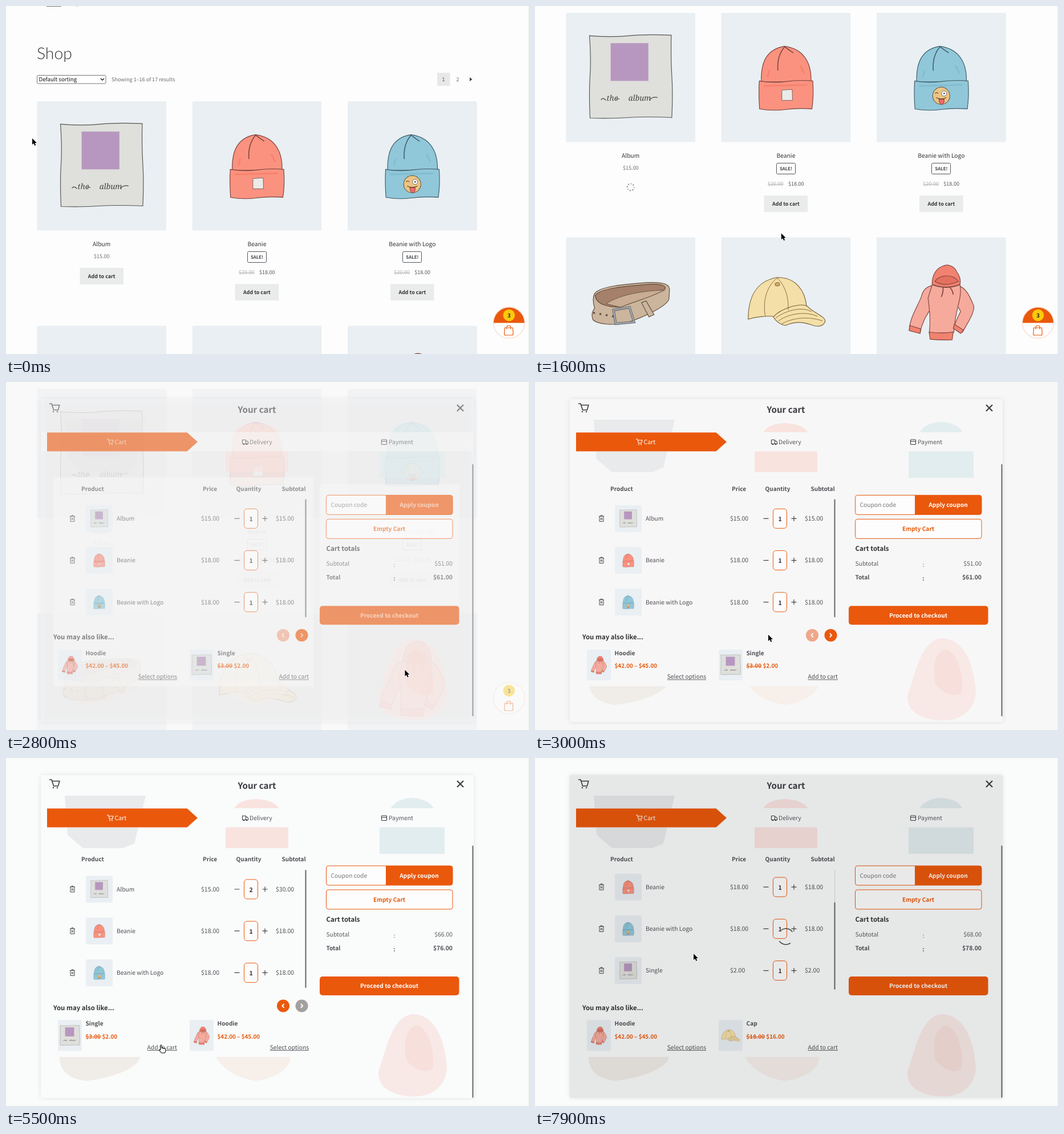
Write an HTML page with a canvas that moves like this. It is 917 by 610 pixels and loops after 8 s.

```html
<!DOCTYPE html>
<html lang="en">
<head>
<meta charset="utf-8">
<title>Shop</title>
<style>
html, body { margin: 0; width: 100%; height: 100%; overflow: hidden; background: #fdfdfd; }
canvas { display: block; }
</style>
</head>
<body>
<canvas id="stage" width="917" height="610"></canvas>
<script>
const g = document.getElementById('stage').getContext('2d');
const SANS = '"Noto Sans CJK JP", "Noto Sans CJK SC", "Noto Sans", sans-serif';
const ORANGE = '#ea580c', DARK = '#3c3c42', GREY = '#6d6d6d', TILE = '#e9eff3';

const clamp = v => Math.min(1, Math.max(0, v));
const ease = (t, a, b) => { const u = clamp((t - a) / (b - a)); return u * u * (3 - 2 * u); };

// ---- drawing helpers ----
function scoped(draw) { g.save(); draw(); g.restore(); }

// y is the middle of the capitals; returns the width
function text(s, x, y, size = 10.3, color = DARK, weight = 400, align = 'left') {
  g.font = `${weight} ${size}px ${SANS}`;
  g.textAlign = align;
  g.fillStyle = color;
  g.fillText(s, x, y + size * .37);
  return g.measureText(s).width;
}
function struck(s, x, y, size, color, weight) {
  const w = text(s, x, y, size, color, weight);
  g.fillRect(x, y + .3, w, .9);
  return w;
}
function box(x, y, w, h, r, fill, stroke, width = 1) {
  g.beginPath();
  g.roundRect(x, y, w, h, r);
  paint(fill, stroke, width);
}
function disc(x, y, r, fill, stroke, width = 1) {
  g.beginPath();
  g.arc(x, y, r, 0, 7);
  paint(fill, stroke, width);
}
function paint(fill, stroke, width, path) {
  if (fill) { g.fillStyle = fill; path ? g.fill(path) : g.fill(); }
  if (stroke) { g.strokeStyle = stroke; g.lineWidth = width; path ? g.stroke(path) : g.stroke(); }
}
function shape(d, fill, stroke, width = 1.15) { paint(fill, stroke, width, new Path2D(d)); }

// ---- product pictures, on a 226 unit tile ----
function album() {
  shape('M41 40Q80 43 110 40T184 39Q183 80 185 110T185 183Q140 181 110 183T42 184Q40 140 42 110T41 40Z', '#dfdfdc', '#555552');
  g.fillStyle = '#b797bf';
  g.fillRect(78, 53, 66, 66);
  g.font = 'italic 13.5px "Noto Serif", "Liberation Serif", serif';
  g.textAlign = 'left';
  g.fillStyle = '#444';
  g.fillText('the', 71, 154);
  g.fillText('album', 109, 154);
  shape('M61 152q4-5 9 1M88 152q3-3 5-1M146 152q6-6 14-4', null, '#444');
}
function beanie(color, ink, shade) {
  shape('M70 121C69 88 78 64 110 58.5C142 62 158 85 157 120Z', color, ink);
  shape('M66.5 119Q90 123 113 120T160 119Q162 145 158.5 168Q135 166 112 169T67 168Q65 140 66.5 119Z', color, ink);
  shape('M111 59Q97 75 99 101M110 58.5Q118 65 126 70', null, ink, 1.5);
  shape('M74 128L150 126M138 92l7 14M84 100l-3 12', null, shade, 3);
}
function redBeanie() {
  beanie('#fa927f', '#7a423b', '#f6836f');
  shape('M106 135L124 134L124.5 153L106 153Z', '#ebebea', '#7a5a55', .9);
}
function blueBeanie() {
  beanie('#90c7d9', '#3e5c68', '#82bdd0');
  disc(113, 145, 15, '#ecc584', '#5e5240');
  disc(118, 141, 4.5, '#fff', '#555', .8);
  disc(118, 141, 1.3, '#444');
  shape('M102 141q3-3 6 0M104 148q9 5 18 0', null, '#5e4530');
  shape('M109 151h9q1 8-4 9q-5 0-5-9Z', '#ee6a6a', '#7a3a3a', .9);
}
function belt() {
  const ink = '#5f4a3b', leather = '#cbb59d';
  shape('M50 98C58 86 100 82 140 79C165 78 180 80 181 90L180 108C176 120 140 138 104 150C80 154 55 152 47 144C44 136 45 130 50 124C47 114 47 104 50 98Z', leather, ink);
  shape('M51 101C60 89 105 85 145 82C168 81 178 85 172 92C150 104 120 112 95 122C75 122 52 118 51 101Z', '#a5806a', ink);
  shape('M70 116C95 100 130 94 172 92C150 104 120 112 95 122Z', '#c8ad94', ink, .8);
  for (const i of [0, 1, 2, 3]) disc(49 + i * 11, 132 + i * 2, 1.9, '#6b5344');
  shape('M83 127L111 122L119 148L87 151Z', null, '#53565b', 4);
  shape('M83 127L111 122L119 148L87 151Z', null, '#a6aab0', 2.4);
  shape('M132 114l8-3l14 24l-9 4Z', leather, ink);
}
function cap() {
  const ink = '#78633c', fill = '#f5dfa8';
  shape('M47 143C47 105 61 76 98 70C130 70 146 92 149 120C130 120 105 128 97 139C80 136 60 139 47 143Z', fill, ink);
  shape('M91 139C104 124 138 114 150 120C160 132 182 137 181.5 147C178 156 168 157 158 153C140 147 128 147 112 154C102 152 95 146 91 139Z', fill, ink);
  shape('M98 71C78 85 72 115 77 138M98 71C112 85 118 105 117 127M95 141C112 128 140 120 158 130M100 146C116 134 146 128 168 138M106 151C124 141 150 137 177 146', null, ink, .9);
  g.beginPath();
  g.ellipse(98, 82, 4, 3, 0, 0, 7);
  paint('#d8ac5c', ink, 1);
}
function hoodie() {
  const ink = '#80443d', fill = '#f5aa9c', deep = '#f28270';
  shape('M144 85C157 88 164 106 170 120C171 132 160 148 150 166L135 157C139 144 144 136 147 129L136 112Z', fill, ink);
  shape('M98 84C86 86 81 93 78 104C72 120 58 140 57 162L76 167C79 150 86 138 95 124Z', fill, ink);
  shape('M97 83Q122 92 146 83C150 108 137 125 135 166L92 168C95 142 92 125 90 106Z', fill, ink);
  shape('M92 165.5Q112 169 134 165.5L132 179Q112 180 93.5 178Z', deep, ink);
  shape('M58 154L77 160L76 168L57 163ZM136 152L152 162L147 168L134 159Z', deep, ink);
  shape('M97 82C97 66 104 54 116 50C124 46 136 50 140 60C146 68 147 76 146 82C130 88 112 88 97 82Z', deep, ink);
  shape('M102 77C109 65 134 63 143 77C128 84 112 84 102 77Z', '#e5705f', ink);
  shape('M116 86q1 10-3 18M127 86q6 6 7 14', null, ink, 1.7);
}
function tile(art, x, y, w, h = w) {
  scoped(() => {
    box(x, y, w, h, 2, TILE);
    g.clip();
    const s = Math.max(w, h) / 226;
    g.translate(x + w / 2 - 113 * s, y + h / 2 - 113 * s);
    g.scale(s, s);
    art();
  });
}

// ---- shop page ----
function button(x, y, fill) {
  box(x - 38.3, y, 76.6, 29, 0, fill);
  text('Add to cart', x, y + 14.5, 8.9, '#333', 600, 'center');
}
function product(name, art, x, y, onSale, t) {
  const mid = x + 113.3;
  tile(art, x, y, 226.6);
  text(name, mid, y + 250, 10.3, '#333', 400, 'center');
  if (onSale) {
    box(Math.round(mid) - 16.5, y + 263.5, 33, 19, 2, null, '#55575d');
    text('SALE!', mid, y + 273, 7.8, '#43454b', 600, 'center');
    struck('$20.00', mid - 32, y + 300, 9.06, '#b0b0b0');
    text('$18.00', mid + 4, y + 300, 9.06, '#555');
    button(mid, y + 320.3, '#eaebeb');
    return;
  }
  text('$15.00', mid, y + 271.5, 9.06, GREY, 400, 'center');
  if (t < 1200) return button(mid, y + 292, t >= 800 ? '#d4d4d4' : '#eaebeb');
  for (let i = 0; i < 8; i++) {
    const a = i * Math.PI / 4 + t * .004;
    disc(mid + 6 * Math.cos(a), y + 305.5 + 6 * Math.sin(a), 1.3, i % 3 ? '#999' : '#bbb');
  }
}
function basketButton(t) {
  const hover = t >= 2200, y = hover ? 554 : 555;
  disc(882, y, 27.5, '#fff', '#fbe0d3', 1.5);
  if (!hover) {
    g.beginPath();
    g.arc(882, 555.5, 27, Math.PI, 0);
    paint(ORANGE);
  }
  disc(882, y - 13, 10.3, '#fdc90a');
  text('3', 882, y - 13, 9.6, '#222', 700, 'center');
  scoped(() => {
    g.translate(881.5, y + 13.5);
    shape('M-7-4.5h14l.7 11q0 2-2 2h-11.4q-2 0-2-2ZM-3.5-2v-3a3.5 3.5 0 0 1 7 0v3', null, ORANGE, 1.2);
  });
}
function page(t) {
  g.fillStyle = '#fdfdfd';
  g.fillRect(0, 0, 917, 610);
  scoped(() => {
    g.translate(0, -155 * ease(t, 0, 800));
    g.fillStyle = '#555';
    g.fillRect(71, 0, 26, .8);
    g.fillRect(124, 0, 1, 1);
    g.font = '300 28.3px Lato, sans-serif';
    g.textAlign = 'left';
    g.fillStyle = '#333';
    g.fillText('Shop', 54, 93);
    box(54.5, 121.5, 120.5, 14.5, 2, '#fff', '#767676');
    text('Default sorting', 57.5, 128.5, 9.7, '#111');
    shape('M166 127l3 3l3-3', null, '#222', 1.5);
    text('Showing 1–16 of 17 results', 185, 128.5, 9.06, GREY);
    g.fillStyle = '#e8e8e8';
    g.fillRect(756, 117, 22.5, 23);
    text('1', 767, 128.5, 9.06, '#555', 400, 'center');
    text('2', 792, 128.5, 9.06, GREY, 400, 'center');
    shape('M813 125l4.5 3.5l-4.5 3.5Z', '#444');
    product('Album', album, 54.4, 167, false, t);
    product('Beanie', redBeanie, 326.6, 167, true, t);
    product('Beanie with Logo', blueBeanie, 599, 167, true, t);
    [belt, cap, hoodie].forEach((art, i) => tile(art, 54.4 + i * 272.3, 560.6, 226.6));
  });
  g.fillStyle = '#ececec';
  g.fillRect(916, 0, 1, 610);
  basketButton(t);
}

// ---- cart panel ----
function ghosts(paper) {
  shape('M103 66H245L225 150L205 158H135L108 135Z', '#e9eaec');
  shape('M385 158V122L396 120C394 90 400 74 438 72C478 74 486 90 484 120L495 122V158Z', '#f9e3df');
  shape('M655 168V122L668 120C668 92 676 72 712 70C748 72 757 92 755 120L769 122V168Z', '#e2edef');
  shape('M94 524H235C232 545 180 562 140 566C112 562 94 550 94 524Z', '#f0ece8');
  shape('M368 524H498C500 545 470 562 438 566C410 562 385 550 368 524Z', '#f6efea');
  shape('M714 449C750 450 770 490 773 545C770 580 740 597 705 593C670 588 652 575 653 550C668 510 676 452 714 449Z', '#f8e9e6');
  shape('M720 468C742 475 752 515 748 545C735 555 715 545 702 530C696 500 700 475 720 468Z', '#f7dfdb');
  g.fillStyle = paper;
  g.fillRect(62, 88, 757, 33.5);
}
function header() {
  shape('M76 38h4l3.5 11h8l2.3-8.5H81', null, DARK, 1.6);
  disc(83, 52, 1.2, DARK);
  disc(90, 52, 1.2, DARK);
  text('Your cart', 440, 48, 15.2, DARK, 600, 'center');
  shape('M791 40l11 11M802 40l-11 11', null, DARK, 2.2);
  shape('M72 88.5H317.5L336 105L317.5 121.5H72Z', ORANGE);
  shape('M177 100h2.5l2 7h5l1.5-5h-8', null, '#fff', 1.1);
  disc(182, 109.5, 1, '#fff');
  disc(186, 109.5, 1, '#fff');
  text('Cart', 190.5, 105, 10.5, '#fff', 500);
  shape('M414.5 101.5h6v7h-6ZM420.5 103.5h2.5l1.5 2v3h-4', null, DARK, 1.1);
  disc(417, 109, 1.3, DARK);
  disc(422, 109, 1.3, DARK);
  text('Delivery', 427, 105, 10.4, '#55555b', 500);
  box(658.5, 101, 9, 8.5, 1, null, DARK, 1.1);
  shape('M658.5 104h9', null, DARK, 1.1);
  text('Payment', 671, 105, 10.4, '#55555b', 500);
}
function cartRow(name, art, price, qty, sum, y) {
  shape(`M112 ${y - 4}h9M115 ${y - 4}v-1.5h3v1.5M113 ${y - 4}v9h7v-9M115.5 ${y - 1.5}v4M117.5 ${y - 1.5}v4`, null, '#444', 1);
  tile(art, 140, y - 23.5, 47);
  text(name, 194, y, 10.3, '#505056');
  text(price, 342, y, 10.5, '#505056');
  shape(`M400.5 ${y}h9M449.5 ${y}h9M454 ${y - 4.5}v9`, null, '#444', 1.2);
  box(417.5, y - 17, 24, 34, 5, '#fdfdfd', ORANGE);
  text(qty, 429.5, y + 1, 10.5, '#333', 600, 'center');
  text(sum, 473, y, 10.5, '#505056');
}
function cartList(t, doubled, added) {
  text('Product', 132, 177.5, 10.1, '#505056', 600);
  text('Price', 345, 177.5, 10.1, '#505056', 600);
  text('Quantity', 403.5, 177.5, 10.1, '#505056', 600);
  text('Subtotal', 483.5, 177.5, 10.1, '#505056', 600);
  const scroll = ease(t, 6350, 6700);
  const rows = [
    ['Album', album, '$15.00', doubled ? 2 : 1, doubled ? '$30.00' : '$15.00'],
    ['Beanie', redBeanie, '$18.00', 1, '$18.00'],
    ['Beanie with Logo', blueBeanie, '$18.00', 1, '$18.00']
  ];
  if (added) rows.push(['Single', album, '$2.00', 1, '$2.00']);
  scoped(() => {
    g.beginPath();
    g.rect(83, 196, 455, 210);
    g.clip();
    rows.forEach((r, i) => cartRow(...r, 230 + i * 73.2 - scroll * 77));
  });
  if (added) box(525, 196, 1.2, 210, 0, '#ddd');
  box(524.5, 196 + scroll * 57, 2, added ? 153 : 207, 1, '#66666a');
}
function totals(sub, total) {
  box(561.5, 189, 221.5, 34, 4, '#fdfdfd', ORANGE);
  text('Coupon code', 569.5, 206, 10.3, '#77777c');
  box(666, 189, 117, 34, [0, 4, 4, 0], ORANGE);
  text('Apply coupon', 724.5, 206, 10.2, '#fff', 600, 'center');
  box(561.5, 231, 221.5, 34, 4, '#fdfdfd', ORANGE);
  text('Empty Cart', 672, 248, 10.2, ORANGE, 600, 'center');
  text('Cart totals', 561.5, 282.5, 11.5, '#333', 600);
  text('Subtotal', 561.5, 309, 10.3, '#5a5a60');
  text(':', 681, 311, 10.3, '#5a5a60', 400, 'center');
  text(sub, 783, 309, 10.4, '#5a5a60', 400, 'right');
  text('Total', 561.5, 333, 10.2, '#505056', 600);
  text(':', 681, 335, 10.3, '#505056', 600, 'center');
  text(total, 783, 333, 10.4, '#505056', 600, 'right');
  box(550, 383, 244.5, 33, 5, ORANGE);
  text('Proceed to checkout', 672, 399.5, 10.2, '#fff', 600, 'center');
}
function offer(name, art, was, price, link, x) {
  tile(art, x, 459.5, 42, 54);
  text(name, x + 48.5, 465.5, 10.2, '#505056', 600);
  const w = was ? struck(was, x + 48.5, 488, 9.9, ORANGE, 600) + 2.5 : 0;
  text(price, x + 48.5 + w, 488, 9.9, ORANGE, 600);
  const len = text(link, x + 209, 507, 10.3, '#505056', 500, 'right');
  g.fillRect(x + 209 - len, 512, len, .9);
}
function arrow(x, dir, fill) {
  disc(x, 434.5, 11, fill);
  shape(`M${x - 1.7 * dir} 431l${3.4 * dir} 3.5l${-3.4 * dir} 3.5`, null, '#fff', 1.8);
}
function carousel(t, added) {
  const hood = ['Hoodie', hoodie, '', '$42.00 – $45.00', 'Select options'];
  const single = ['Single', album, '$3.00', '$2.00', 'Add to cart'];
  const hat = ['Cap', cap, '$18.00', '$16.00', 'Add to cart'];
  const slide = added ? 0 : ease(t, 3400, 3700);
  text('You may also like...', 83, 437.5, 11.4, '#333', 600);
  if (!added) {
    arrow(486, -1, t < 3400 ? '#efa78b' : ORANGE);
    arrow(518.5, 1, t < 3400 ? ORANGE : '#a3a09f');
  }
  scoped(() => {
    g.beginPath();
    g.rect(83, 450, 455, 74);
    g.clip();
    (added ? [hood, hat] : [hood, single, hood])
      .forEach((o, i) => offer(...o, 91 + 231 * (i - slide)));
  });
}
function panel(t) {
  const early = t < 3200, added = t >= 6000, doubled = t >= 3200;
  const paper = early ? '#f7f7f7' : '#fafbfb';
  const shift = 9.4 * (1 - ease(t, 3000, 3300));
  g.fillStyle = early ? '#f7f7f7' : '#f9fcfb';
  g.fillRect(0, 0, 917, 610);
  g.fillStyle = '#ececec';
  g.fillRect(916, 0, 1, 610);
  scoped(() => {
    g.shadowColor = 'rgba(0,0,0,.1)';
    g.shadowBlur = 8;
    box(61, 30, 759, 566, 3, paper);
  });
  ghosts(paper);
  header();
  scoped(() => {
    g.translate(0, shift);
    g.fillStyle = paper;
    g.fillRect(83, 158, 456, 366);
    g.fillRect(550, 170, 245, 247);
    cartList(t, doubled, added);
    totals(...(added ? ['$68.00', '$78.00'] : doubled ? ['$66.00', '$76.00'] : ['$51.00', '$61.00']));
    carousel(t, added);
  });
  box(817.5, 153.5 - shift, 2, 442, 1, '#66666a');

  const dim = clamp((t - 7300) / 300);
  if (!dim) return;
  box(61, 30, 759, 566, 3, `rgba(0,0,0,${.08 * dim})`);
  const turn = (t - 7900) * .006;
  for (const a of [.96, 4.1]) {
    g.beginPath();
    g.arc(440, 313, 14, a + turn, a + turn + 1.57);
    paint(null, '#444', 1.5);
  }
}

// ---- pointer: time, x, y ----
const moves = [
  [0, 46, 232], [200, 46, 232], [850, 184, 319], [1200, 184, 319], [2200, 888, 545],
  [2650, 888, 545], [3000, 409, 443], [3350, 518, 436], [3800, 518, 436], [4600, 272, 503],
  [5700, 272, 503], [6400, 236, 353], [7000, 236, 353], [7400, 278, 343], [8000, 278, 343]
];
const overLinks = [[800, 1300], [2150, 2700], [3300, 3850], [4550, 5750]];
function pointer(t) {
  const i = moves.findIndex(m => m[0] > t);
  const [t0, x0, y0] = moves[i - 1], [t1, x1, y1] = moves[i];
  const u = ease(t, t0, t1);
  scoped(() => {
    g.translate(x0 + (x1 - x0) * u, y0 + (y1 - y0) * u);
    g.lineJoin = 'round';
    if (overLinks.some(([a, b]) => t >= a && t < b)) {
      g.scale(1.12, 1.12);
      shape('M-1 1q1-2 2 0v4q1.5-1 2 .3q1.5-.8 2 .5q1.8-.6 2 1v2.5l-1.2 3.2h-5.3l-3.7-4.5q0-1.5 2.2-.2Z', '#fff', '#111', .95);
    } else {
      const d = 'M0 0V11L2.6 8.7L4.4 12.7L6.3 11.9L4.6 8H8Z';
      shape(d, null, '#fff', 1.6);
      shape(d, '#000');
    }
  });
}

function frame(now) {
  const t = Math.floor(now % 8000 / 100) * 100;
  g.textRendering = 'geometricPrecision';
  if (t < 2900) page(t);
  const shown = clamp((t - 2650) / 250);
  if (shown) scoped(() => { g.globalAlpha = shown; panel(t); });
  pointer(t);
  requestAnimationFrame(frame);
}
requestAnimationFrame(frame);
</script>
</body>
</html>
```
